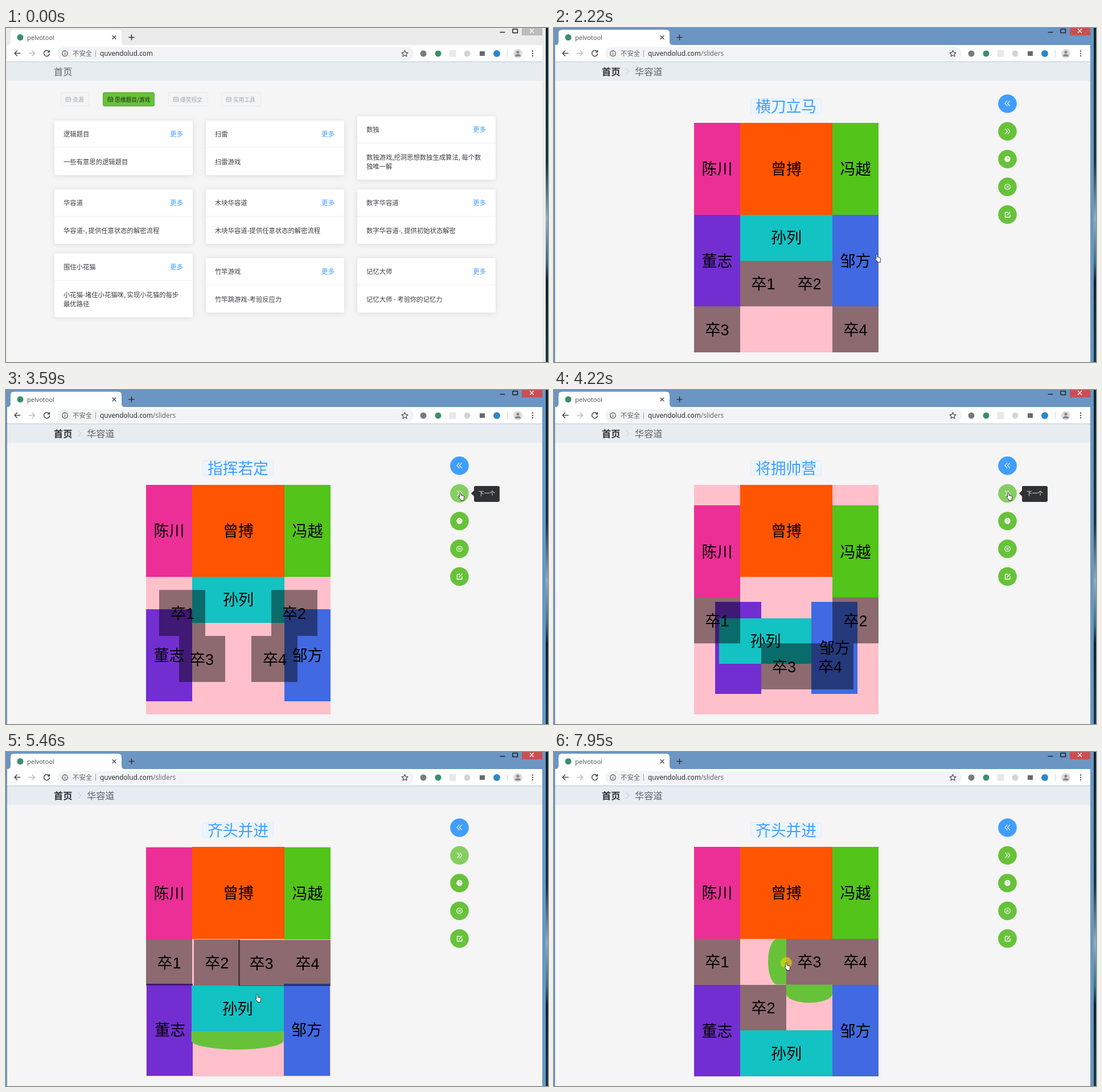
These frames come from a looping animation (952 px wide and 588 px high, 8 s). An HTML page:

```html
<!DOCTYPE html>
<html lang="zh-CN">
<head>
<meta charset="utf-8">
<style>
html, body { margin: 0; width: 100%; height: 100%; overflow: hidden; background: #f5f5f5 }
svg { display: block; width: 952px; height: 588px; font-family: "Noto Sans CJK SC", "Noto Sans CJK", sans-serif; font-weight: 300 }
.latin { font-family: "Open Sans", "Noto Sans", sans-serif; font-weight: 400 }
.tile { font-family: "Liberation Sans", "Noto Sans CJK SC", "Noto Sans CJK", sans-serif }
.card { filter: drop-shadow(0 1.6px 4.5px rgba(0,0,0,.11)) }
.line { fill: none; stroke-linecap: round; stroke-linejoin: round }
</style>
</head>
<body>
<svg id="stage" viewBox="0 0 952 588"></svg>
<script>
const LOOP = 8000, MOVE = 820, CELL = 81, ROW = 80.85, LEFT = 246, TOP = 167;

const rect = (x, y, w, h, fill, more = '') =>
  `<rect x="${x}" y="${y}" width="${w}" height="${h}" fill="${fill}" ${more}/>`;
const circle = (x, y, r, fill, more = '') => `<circle cx="${x}" cy="${y}" r="${r}" fill="${fill}" ${more}/>`;
const line = (d, color, width = 1, more = '') =>
  `<path class="line" d="${d}" stroke="${color}" stroke-width="${width}" ${more}/>`;
// y is the vertical middle of the glyphs
const text = (x, y, size, fill, str, more = '') =>
  `<text x="${x}" y="${y + size * .38}" font-size="${size}" fill="${fill}" ${more}>${str}</text>`;
const mid = 'text-anchor="middle"';

// ---- browser window ----
function chrome() {
  const grey = '#5f6368';
  return `
  <linearGradient id="desk" x2="0" y2="1"><stop stop-color="#0a2229"/><stop offset=".4" stop-color="#12343d"/>
    <stop offset=".57" stop-color="#8fb0bd"/><stop offset=".7" stop-color="#3d6f7f"/><stop offset=".76" stop-color="#0c1f26"/><stop offset="1" stop-color="#143841"/></linearGradient>
  ${rect(0, 0, 952, 588, '#6b96c3', 'id="frame"')}
  ${rect(948, 0, 4, 588, 'url(#desk)')}
  ${rect(906, 0, 36, 13, '#c75050', 'id="close"')}
  ${line('M920.5 2l6 6m0-6l-6 6', '#fff', 1.5)}
  ${line('M868 7.5h8M890 2h8.500v6.500h-8.500z', '#222', 1.5)}
  <path d="M2 30q6 0 6-6V9q0-6 6-6H197q6 0 6 6V24q0 6 6 6z" fill="#fff"/>
  ${circle(25, 16.5, 5.5, '#3a8f6c')}
  ${text(37, 17, 11, '#45494d', 'pelvotool', 'class="latin"')}
  ${line('M187 13.500l6 6m0-6l-6 6', '#45494d', 1.3)}
  ${line('M216 16.500h9M220.500 12v9', '#333', 1.5)}
  ${rect(2, 30, 940, 30, '#fff')}
  ${rect(90, 33.5, 626, 23, '#f1f3f4', 'rx="11.500"')}
  ${line('M25 44.500H15m4.500-4.500l-4.500 4.500 4.500 4.500', '#45494d', 1.5)}
  ${line('M40.500 44.500h10m-4.500-4.500l4.500 4.500-4.500 4.500', '#b9bcc0', 1.5)}
  ${line('M75.500 41.500a5 5 0 1 0 1 4M76.500 39.500v3h-3', '#45494d', 1.5)}
  ${circle(103.5, 44.8, 4.8, 'none', `stroke="${grey}" stroke-width="1.300"`)}
  ${line('M103.500 44.500v2.500M103.500 42.400v.1', grey, 1.3)}
  ${text(117, 45, 11.4, grey, '不安全')}
  ${line('M157.500 39.500v11', '#9aa0a6')}
  <text class="latin" x="165" y="49" font-size="11.8" fill="#202124">quvendolud.com<tspan id="path" fill="${grey}">/sliders</tspan></text>
  ${line('M700.500 39.500l1.600 3.600 3.900.4-2.900 2.600.8 3.900-3.400-2-3.400 2 .8-3.900-2.900-2.600 3.900-.4z', '#45494d', 1.2)}
  ${circle(733, 45, 5.5, '#777b7f')}${circle(759, 45, 5.5, '#3a8f6c')}
  ${rect(778.5, 39, 12, 12, '#e8e8e8')}${circle(810, 45, 5.5, '#d5d3d3')}
  ${rect(832, 41, 9, 8, '#66696d')}${circle(862, 45, 6, '#2d87c8')}
  ${line('M880.500 39v12', '#d0d3d6')}
  ${circle(899, 45, 8, '#dcdcdc')}${circle(899, 42.5, 2.6, '#888')}
  <path d="M894 50q0-4 5-4t5 4z" fill="#888"/>
  ${[40.5, 44.7, 48.9].map(y => circle(925, y, 1.2, '#45494d')).join('')}
  ${rect(2, 59, 940, 1, '#b3cadb')}
  ${rect(2, 60, 940, 528, '#f5f5f5')}
  ${rect(2, 60, 940, 33, '#e7ecf1')}`;
}

// ---- start page ----
function tag(x, w, label, on) {
  const ink = on ? '#1d2b16' : '#a3a6ab';
  return rect(x + .5, 113.5, w - 1, 24, on ? '#67c23a' : '#f4f4f5', `stroke="${on ? '#57a831' : '#e9e9eb'}" rx="2.500"`)
    + line(`M${x + 9.5} 122.500h8v7h-8zm0 2.500h8m-6-4v1.500m4-1.500v1.500m-4.500 4.500h5`, ink, .8)
    + text(x + 21, 126, 9.72, ink, label);
}
function card(x, y, name, body) {
  const rows = body.split('|'), ink = '#3c3d40';
  return `<g class="card">${rect(x, y, 243, 80 + 16 * rows.length, '#fff', 'rx="3"')}</g>`
    + rect(x, y + 47, 243, 1, '#ebeef5')
    + text(x + 16, y + 23.5, 11.34, ink, name)
    + text(x + 203, y + 23.5, 11.6, '#409eff', '更多')
    + rows.map((r, i) => text(x + 16, y + 72.5 + 16 * i, 11.34, ink, r)).join('');
}
const home = () => text(84, 76.5, 16.2, '#606266', '首页')
  + tag(96, 50, '资源') + tag(170, 91, '思维题目/游戏', true) + tag(285, 70, '爆笑短文') + tag(378, 70, '实用工具')
  + card(85, 163, '逻辑题目', '一些有意思的逻辑题目')
  + card(351, 163, '扫雷', '扫雷游戏')
  + card(617, 155, '数独', '数独游戏,挖洞思想数独生成算法, 每个数|独唯一解')
  + card(85, 284, '华容道', '华容道-, 提供任意状态的解密流程')
  + card(351, 284, '木块华容道', '木块华容道-提供任意状态的解密流程')
  + card(617, 284, '数字华容道', '数字华容道-, 提供初始状态解密')
  + card(85, 397, '围住小花猫', '小花猫-堵住小花猫咪, 实现小花猫的每步|最优路径')
  + card(351, 405, '竹竿游戏', '竹竿跳游戏-考验反应力')
  + card(617, 405, '记忆大师', '记忆大师 - 考验你的记忆力');

// ---- puzzle page ----
const soldier = 'rgba(0,0,0,.45)';
const pieces = [
  ['曾搏', 2, 2, '#ff5500'], ['陈川', 1, 2, '#eb2f96'], ['冯越', 1, 2, '#52c41a'],
  ['董志', 1, 2, '#722ed1'], ['邹方', 1, 2, '#4169e1'], ['孙列', 2, 1, '#13c2c2'],
  ...[1, 2, 3, 4].map(n => ['卒' + n, 1, 1, soldier])
];
// start time, title, column and row of each piece
const steps = [
  [-MOVE, '横刀立马', '10 00 30 02 32 12 13 23 04 34'],
  [3246, '指挥若定', '10 00 30 03 33 12 02 32 13 23'],
  [4000, '将拥帅营', '10 01 31 12 22 04 03 33 24 34'],
  [4780, '齐头并进', '10 00 30 03 33 13 02 12 22 32'],
  [6278, '齐头并进', '10 00 30 03 33 14 02 12 22 32'],
  [7082, '齐头并进', '10 00 30 03 33 14 02 13 22 32']
].map(([start, title, cells]) => ({ start, title, cells: cells.split(' ') }));

// hints for possible moves: piece, side, from, to
const hints = [
  [5, 'down', 5400, 6278], [5, 'up', 6278, 6600],
  [7, 'down', 6700, 7082], [7, 'up', 7082, 7450],
  [8, 'left', 7500, LOOP], [8, 'down', 7500, LOOP]
];
function dome(side, w, h) {
  return {
    up: `M0 0V-16A${w / 2} 16 0 0 1 ${w} -16V0z`,
    down: `M0 ${h}v16A${w / 2} 16 0 0 0 ${w} ${h + 16}v-16z`,
    left: `M0 0H-16A16 ${h / 2} 0 0 0 -16 ${h}H0z`
  }[side];
}
function piece([name, cols, rows, fill], i) {
  const w = cols * CELL, h = rows * ROW;
  return `<g id="piece${i}">${rect(0, 0, w, h, fill, 'shape-rendering="crispEdges"')}`
    + text(w / 2, h / 2, 27, '#000', name, mid + ' class="tile"')
    + hints.map(([p, side], k) => p === i ? `<path id="hint${k}" d="${dome(side, w, h)}" fill="#67c23a"/>` : '').join('')
    + '</g>';
}
function buttons() {
  const x = 796.5, white = '#fff';
  const icons = [
    line('M796 128.500l-4 4.300 4 4.300m4.500-8.600l-4 4.300 4 4.300', white, 1.1),
    line('M792.500 177.500l4 4.300-4 4.300m4.500-8.600l4 4.300-4 4.300', white, 1.1),
    circle(x, 230.5, 5.2, white) + line('M795.200 229.300q.2-1.300 1.400-1.200t1.200 1.300-1.200 1.900M796.600 233v.1', '#67c23a', 1),
    circle(x, 279.5, 4.8, 'none', 'stroke="#fff" stroke-width="1.100"') + line('M795.400 277.700v3.600m2.200-3.600v3.600', white, 1.1),
    line('M797 324.500h-4.500v8.500h8.500v-4.500M796 329.500l5-5.500', white, 1.3)
  ];
  return icons.map((icon, i) => circle(x, 133.2 + 48.8 * i, 16.3, i ? '#67c23a' : '#409eff', `id="button${i}"`) + icon).join('');
}
const puzzle = () => text(84, 76.5, 16.2, '#303133', '首页', 'font-weight="700"')
  + line('M127 71.500l4.500 5-4.500 5', '#b5d3d3', 1.1)
  + text(142, 76.5, 16.2, '#606266', '华容道')
  + rect(345.5, 124.5, 124, 26, '#ecf5ff', 'stroke="#d9ecff" rx="3"')
  + text(407.5, 137.5, 26.8, '#409eff', '', mid + ' id="title"')
  + rect(LEFT, TOP, 4 * CELL, 5 * ROW, '#ffc0cb', 'shape-rendering="crispEdges"')
  + pieces.map(piece).join('') + buttons()
  + `<g id="tip"><path d="M817 182l5-5v10z" fill="#303133"/>${rect(822, 169, 45, 28, '#303133', 'rx="3"')}`
  + text(844.5, 182.5, 9.72, '#fff', '下一个', mid) + '</g>';

const pointer = `<g id="pointer">${circle(3, 1, 10, '#f0dc00', 'id="glow" fill-opacity=".6"')}
  <g fill="#fff" stroke="#222" stroke-width=".9" stroke-linejoin="round">
  <path id="arrow" d="M0 0V10.500L2.500 8.400 4.200 12.300 5.900 11.500 4.200 7.700H7.300z"/>
  <path id="hand" d="M1.800 8.500V1.300q1.200-1.600 2.400 0V5.500l4.400 1q1.200.4 1.100 1.700L9.200 12v2.500H4V13L.5 9.500q-1-1.700.4-1.800z"/></g></g>`;

stage.innerHTML = chrome() + `<g id="home">${home()}</g><g id="puzzle">${puzzle()}</g>` + pointer;

// ---- motion ----
const $ = id => document.getElementById(id);
const show = (id, on) => $(id).style.display = on ? '' : 'none';
const within = (t, a, b) => t >= a && t < b;
const mix = (a, b, p) => a + (b - a) * p;

// cubic-bezier(.25, .1, .25, 1)
function ease(x) {
  if (x >= 1) return 1;
  let lo = 0, hi = 1, s;
  for (let i = 0; i < 20; i++) {
    s = (lo + hi) / 2;
    if (.75 * s * (1 - s) + s ** 3 < x) lo = s; else hi = s;
  }
  return .3 * s * (1 - s) ** 2 + 3 * (1 - s) * s * s + s ** 3;
}

const route = [
  [150, 470, 590], [800, 297, 307], [1300, 297, 307], [2220, 564, 398], [2650, 794, 140], [2950, 795, 180],
  [4740, 795, 180], [4830, 765, 198], [5460, 438, 426], [6200, 392, 432], [6560, 392, 432], [6800, 372, 368],
  [7200, 372, 370], [7600, 423, 361], [7930, 405, 370], [LOOP, 405, 370]
];
const clicks = [1050, 3246, 4000, 4740, 6278, 7082, 8060];

function pointAt(t) {
  const i = Math.max(1, route.findIndex(k => k[0] > t));
  const [t0, x0, y0] = route[i - 1], [t1, x1, y1] = route[i];
  const u = Math.max(0, (t - t0) / (t1 - t0)), p = u * u * (3 - 2 * u);
  return [mix(x0, x1, p), mix(y0, y1, p)];
}

function draw(t) {
  const active = t >= 950;
  $('frame').setAttribute('fill', active ? '#6b96c3' : '#ebebeb');
  $('close').setAttribute('fill', active ? '#c75050' : '#bcbcbc');
  show('path', t >= 1100);
  show('home', t < 1280);
  show('puzzle', t >= 1280);

  const n = steps.filter(s => s.start <= t).length - 1;
  const now = steps[n], before = steps[Math.max(0, n - 1)];
  const p = ease((t - now.start) / MOVE);
  $('title').textContent = now.title;
  pieces.forEach((_, i) => {
    const [c0, r0] = before.cells[i], [c1, r1] = now.cells[i];
    const x = LEFT + CELL * mix(+c0, +c1, p), y = TOP + ROW * mix(+r0, +r1, p);
    $('piece' + i).setAttribute('transform', `translate(${x} ${y})`);
  });
  hints.forEach(([, , from, to], k) => show('hint' + k, within(t, from, to)));

  $('button0').setAttribute('fill', within(t, 2560, 2820) ? '#66b1ff' : '#409eff');
  $('button1').setAttribute('fill', within(t, 2850, 6278) ? '#85ce61' : '#67c23a');
  show('tip', within(t, 2900, 5000));

  const hand = within(t, 780, 2260) || within(t, 2560, 4790) || t >= 5120;
  show('pointer', t >= 150);
  show('hand', hand);
  show('arrow', !hand);
  show('glow', clicks.some(c => within(t, c - 130, c)));
  $('pointer').setAttribute('transform', `translate(${pointAt(t)})`);
}

const begin = performance.now();
function tick() {
  draw((performance.now() - begin) % LOOP);
  requestAnimationFrame(tick);
}
tick();
</script>
</body>
</html>
```
